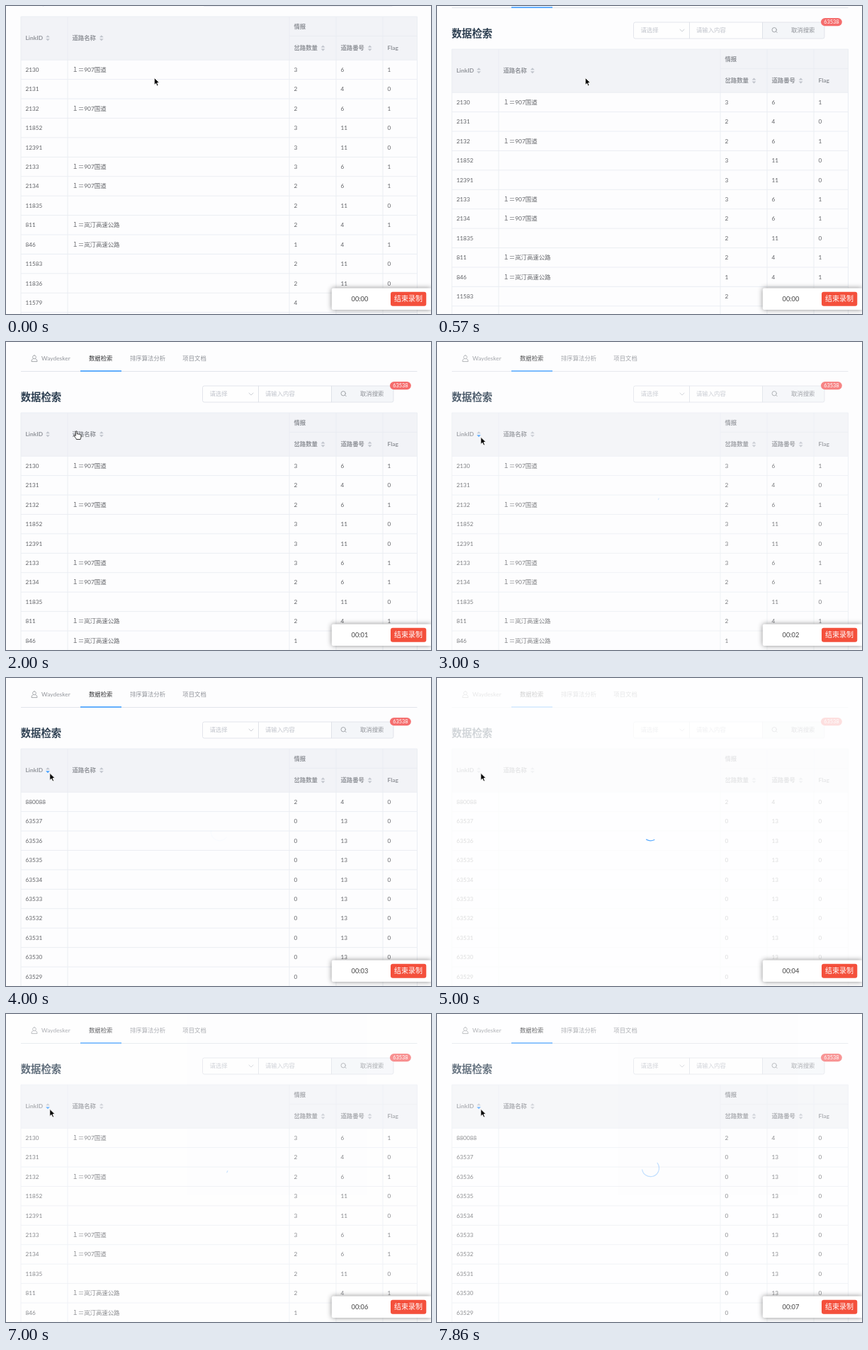
These frames come from a looping animation (600 by 435 pixels, 8 s). An HTML page:

```html
<!DOCTYPE html>
<html lang="zh-CN">
<head>
<meta charset="utf-8">
<title>数据检索</title>
<style>
  html, body { margin: 0; width: 100%; height: 100%; overflow: hidden; background: #fdfdfe; }
  svg { display: block; width: 600px; height: 435px; }
  text { font: 8.4px Lato, "Noto Sans CJK SC", "Noto Sans CJK", sans-serif; fill: #606266; white-space: pre; }
  .num { font-size: 8.2px; }
  .head { font-weight: 700; fill: #909399; }
  .tab { fill: #909399; }
  .tab.on { fill: #303133; font-weight: 500; }
  .title { font-size: 14.4px; font-weight: 700; fill: #2c3e50; }
  .hint { fill: #c0c4cc; }
  .badge { font-size: 7.3px; fill: #fff; text-anchor: middle; }
  .clock { font-size: 9.3px; fill: #444; }
  .stop { font-size: 10px; font-weight: 500; fill: #fff; }
  .box { fill: #fefefe; stroke: #dcdfe6; stroke-width: .8; }
  .grid { fill: none; stroke: #e9ecf2; stroke-width: .9; }
  .icon { fill: none; stroke: #909399; stroke-width: .8; stroke-linecap: round; stroke-linejoin: round; }
  .caret { fill: #c0c4cc; }
  .caret.active { fill: #409eff; }
  .pointer { stroke-linejoin: round; stroke-width: .9; }
  .panel { fill: #fff; filter: drop-shadow(0 0 3.5px rgba(0, 0, 0, .45)); }
  .spinner { fill: none; stroke: #409eff; stroke-width: 1.2; stroke-linecap: round; }
</style>
</head>
<body>
<svg viewBox="0 0 600 435">
  <g id="page"></g>
  <g id="mask">
    <rect width="600" height="435" fill="#fff" fill-opacity=".9"/>
    <circle id="spinner" class="spinner" cx="301.5" cy="217.7" r="12" pathLength="125.66"/>
  </g>
  <g id="cursor" class="pointer">
    <path id="arrow" fill="#000" stroke="#fff" d="M0 0V10.2L2.4 8L4 11.8L5.8 11L4.2 7.3H7.4Z"/>
    <path id="hand" fill="#fff" stroke="#222" d="M-1.8 1.2C-1.8 -.3 .3 -.3 .3 1.2V4.4C.8 3.6 2 3.8 2.2 4.7C2.9 4 4 4.3 4.2 5.2C5 4.7 6 5.2 6 6.2V8.3C6 9.6 5 10.2 5 11.8H-.7C-.9 10.3 -2.5 9 -3.7 7.2C-4.4 6 -3.2 5.4 -2.4 6.2L-1.8 6.8Z"/>
  </g>
  <path class="panel" d="M600 398.5H462Q459.800 398.500 459.800 400.500V427Q459.800 429 462 429H600Z"/>
  <rect x="543" y="403.800" width="50.300" height="20" rx="3" fill="#f4503c"/>
  <text id="clock" class="clock" x="487.500" y="416.800">00:00</text>
  <text class="stop" x="548" y="417.300">结束录制</text>
</svg>
<script>
const $ = id => document.getElementById(id);
const label = (x, middle, str, cls = '') =>
  `<text x="${x}" y="${middle + 3}" class="${cls}">${str}</text>`;
const carets = (x, y, id = '') =>
  `<path class="caret" d="M${x - 2.9} ${y - 1}h5.8l-2.900 -3z"/>
   <path class="caret" id="${id}" d="M${x - 2.9} ${y + 1}h5.8l-2.900 3z"/>`;

const LOOP = 8000, ROW = 27.42, TOP = 161.2, ROWS = 13;
const COLUMNS = [21, 87, 400, 466, 532, 580.5];
const NATIONAL = '１＝907国道', EXPRESS = '１＝岚汀高速公路';

const natural = [
  [2130, NATIONAL, 3, 6, 1], [2131, '', 2, 4, 0], [2132, NATIONAL, 2, 6, 1],
  [11852, '', 3, 11, 0], [12391, '', 3, 11, 0], [2133, NATIONAL, 3, 6, 1],
  [2134, NATIONAL, 2, 6, 1], [11835, '', 2, 11, 0], [811, EXPRESS, 2, 4, 1],
  [846, EXPRESS, 1, 4, 1], [11583, '', 2, 11, 0], [11836, '', 2, 11, 0],
  [11579, '', 4, 11, 0]
];
const descending = Array.from({ length: ROWS }, (_, i) =>
  i ? [63538 - i, '', 0, 13, 0] : [880088, '', 2, 4, 0]);

const rows = (id, data) => `<g id="${id}">` + data.map((row, i) =>
  row.map((value, c) => label(COLUMNS[c] + 6.5, TOP + ROW * (i + .5), value, c === 1 ? '' : 'num')).join('')
).join('') + '</g>';

const gridPath = COLUMNS.map(x => `M${x} 100V540`).join('') + 'M21 100H580.5M400 127.300H580.5' +
  Array.from({ length: ROWS + 1 }, (_, i) => `M21 ${TOP + ROW * i}H580.5`).join('');

$('page').innerHTML = `
  <path class="icon" d="M40 18.800c-3.200 0 -3.200 5 0 5s3.200 -5 0 -5M38.400 23.600c-1.600 .600 -2.400 1.800 -2.400 4h8c0 -2.200 -.800 -3.400 -2.400 -4"/>
  ${label(50, 23.2, 'Waydesker', 'tab')}
  ${label(117, 23.4, '数据检索', 'tab on')}
  ${label(175, 23.4, '排序算法分析', 'tab')}
  ${label(249.3, 23.4, '项目文档', 'tab')}
  <rect x="21" y="41" width="559.500" height="1" fill="#e2e5eb"/>
  <rect x="105" y="40.200" width="58" height="1.600" fill="#409eff"/>
  ${label(20.7, 80.2, '数据检索', 'title')}
  <path class="box" d="M356.500 62H280Q277.500 62 277.500 64.500V82.500Q277.500 85 280 85H356.500Z"/>
  <rect class="box" x="356.500" y="62" width="103" height="23"/>
  <path class="box" style="fill:#f4f6f9" d="M459.500 62H544.500Q547 62 547 64.500V82.500Q547 85 544.500 85H459.500Z"/>
  ${label(287.5, 73.3, '请选择', 'hint')}
  ${label(366, 73.3, '请输入内容', 'hint')}
  ${label(500, 73.3, '取消搜索', 'tab')}
  <path class="icon" style="stroke:#c0c4cc" d="M343 72l3 3l3 -3"/>
  <circle class="icon" cx="476.200" cy="72.700" r="3.200"/>
  <path class="icon" d="M478.600 75l1.600 1.600"/>
  <rect x="542" y="56" width="29.800" height="11.200" rx="5.600" fill="#f56c6c"/>
  ${label(556.9, 61.3, '63538', 'badge')}
  <rect x="21" y="100" width="559.500" height="61.200" fill="#f2f3f7"/>
  <path class="grid" d="${gridPath}"/>
  ${label(27.5, 130, 'LinkID', 'head')}${carets(59, 130.3, 'sortDown')}
  ${label(93.5, 130, '道路名称', 'head')}${carets(134.8, 130.3)}
  ${label(406.5, 113.6, '情报', 'head')}
  ${label(406.5, 144.3, '岔路数量', 'head')}${carets(447.5, 144.4)}
  ${label(472.5, 144.3, '道路番号', 'head')}${carets(513.6, 144.4)}
  ${label(538.5, 144.3, 'Flag', 'head')}
  ${rows('natural', natural)}${rows('descending', descending)}`;

const clamp = x => Math.min(1, Math.max(0, x));
const smooth = x => { x = clamp(x); return x * x * (3 - 2 * x); };
const easeOut = x => 1 - (1 - clamp(x)) ** 2.3;
const mix = (a, b, k) => a + (b - a) * k;

// Each click toggles the sort and shows the loading mask.
const CLICKS = [2930, 4780, 6916];
const FETCH = 800, FADE = 300, FADE_OUT = 824, MASK_END = FADE_OUT + FADE;
const toggledOn = t => CLICKS.filter(click => t >= click).length % 2 === 1;

const SCROLL = [[0, -85], [570, -39], [1140, -2], [1290, 0]];
function scrollAt(t) {
  const i = SCROLL.findIndex(([time]) => time > t);
  if (i < 0) return 0;
  const [[t0, y0], [t1, y1]] = [SCROLL[i - 1], SCROLL[i]];
  return mix(y0, y1, (t - t0) / (t1 - t0));
}

function drawSpinner(age) {
  const phase = (age % 1500) / 750;
  const grow = smooth(phase), slide = smooth(phase - 1);
  const spinner = $('spinner');
  spinner.setAttribute('stroke-dasharray', `${mix(1, 90, grow)} 200`);
  spinner.setAttribute('stroke-dashoffset', -40 * grow - 80 * slide);
  spinner.setAttribute('transform', `rotate(${age * .18} 301.5 217.7)`);
}

const show = (id, on) => $(id).setAttribute('visibility', on ? 'visible' : 'hidden');

function draw(t) {
  $('page').setAttribute('transform', `translate(0 ${scrollAt(t)})`);

  const click = CLICKS.find(c => t >= c && t < c + MASK_END);
  const loading = click !== undefined;
  show('mask', loading);
  if (loading) {
    const age = t - click;
    $('mask').setAttribute('opacity', easeOut((age - 45) / FADE) * (1 - easeOut((age - FADE_OUT) / FADE)));
    drawSpinner(age);
  }

  const sorted = toggledOn(t - FETCH);
  show('natural', !sorted);
  show('descending', sorted);
  $('sortDown').classList.toggle('active', toggledOn(t));

  const move = smooth((t - 1400) / 900);
  $('cursor').setAttribute('transform', `translate(${mix(209.3, 61.8, move)} ${mix(101.3, 134.3, move)})`);
  const hand = t > 1400 && !loading;
  show('hand', hand);
  show('arrow', !hand);

  $('clock').textContent = '00:0' + Math.max(0, Math.floor((t - 500) / 1000));
}

const start = performance.now();
function tick() {
  const t = (performance.now() - start) % LOOP;
  const picture = Math.floor((t + 5) * 7 / 1000);
  draw(Math.min(LOOP - 1, Math.round(picture * 100 / 7) * 10));
  requestAnimationFrame(tick);
}
tick();
</script>
</body>
</html>
```
